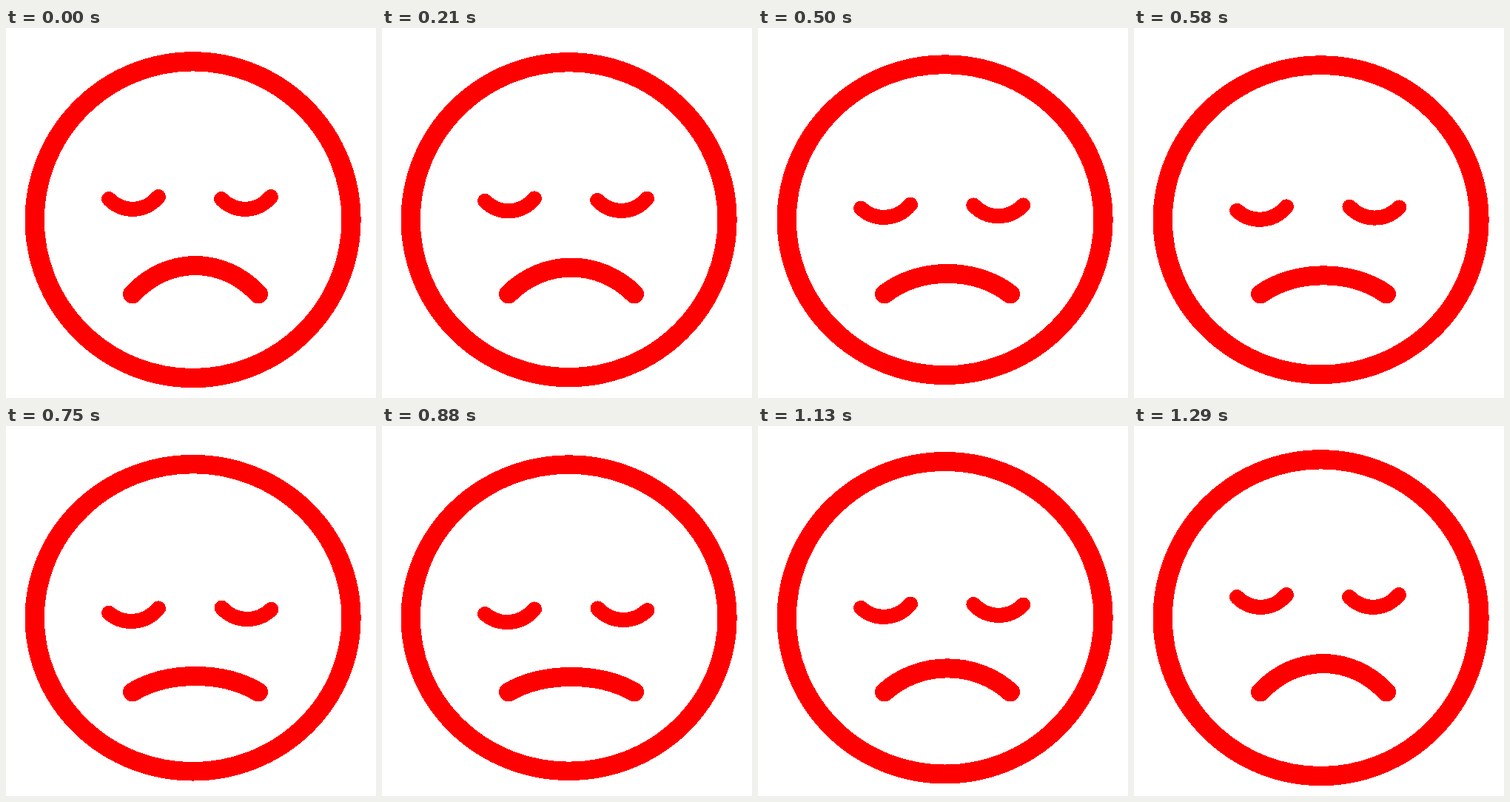
These frames come from a looping animation (500 px wide and 500 px high, 1.68 s). An HTML page:

```html
<!DOCTYPE html>
<html lang="en">
<head>
<meta charset="utf-8">
<title>Sad face</title>
<style>
  html, body { margin: 0; width: 100%; height: 100%; overflow: hidden; background: #fff; }
  svg { display: block; width: 100%; height: 100%; shape-rendering: crispEdges; }
  svg * { fill: none; stroke: #f00; stroke-linecap: round; }
</style>
</head>
<body>
<svg viewBox="0 0 500 500">
  <g id="face"><circle r="213.9" stroke-width="26.2"/></g>
  <path id="mouth" stroke-width="26"/>
  <path id="left" stroke-width="20"/>
  <path id="right" stroke-width="20"/>
</svg>
<script>
const LOOP = 1680, FPS = 24, END = 31;

const el = id => document.getElementById(id);
const clamp = x => Math.min(1, Math.max(0, x));
const ease = x => x * x * (3 - 2 * x);
const easeIn = x => x * x * (2 - x);

// Fall from full droop at a given step back to rest
const settle = (step, from) => 1 - ease(clamp((step - from) / (END - from)));
const wave = (step, peak) => step < peak ? ease(step / peak) : settle(step, peak);

// Eyes drop, rest for a moment and lift again
const eyeDroop = step => Math.min(easeIn(clamp(step / 19)), settle(step, 24.3));

// Curve between two ends, pulled towards one level
function bow(id, x, y1, width, y2, level) {
  const inset = 0.28 * width, end = x + width;
  el(id).setAttribute('d', `M${x} ${y1}C${x + inset} ${level} ${end - inset} ${level} ${end} ${y2}`);
}

function eye(id, x, drop1, drop2, p) {
  const sag = (drop1 + drop2) / 2 - 1.5;
  bow(id, x, 231 + drop1 * p, 67, 228 + drop2 * p, 250 + sag * p);
}

function draw(ms) {
  const step = Math.floor((Math.floor(ms / 10) + 0.49) * FPS / 100);
  const squash = 1 - 0.0317 * wave(step, 21.6);
  const p = eyeDroop(step);
  el('face').setAttribute('transform', `translate(252.6 259.2) scale(1 ${squash})`);
  bow('mouth', 171, 359.5, 170, 359.5, 308.2 + 24 * wave(step, 21));
  eye('left', 139, 23, 19.5, p);
  eye('right', 291 + p / 2, 15.5, 21, p);
}

function tick() {
  draw(performance.now() % LOOP);
  requestAnimationFrame(tick);
}
tick();
</script>
</body>
</html>
```
